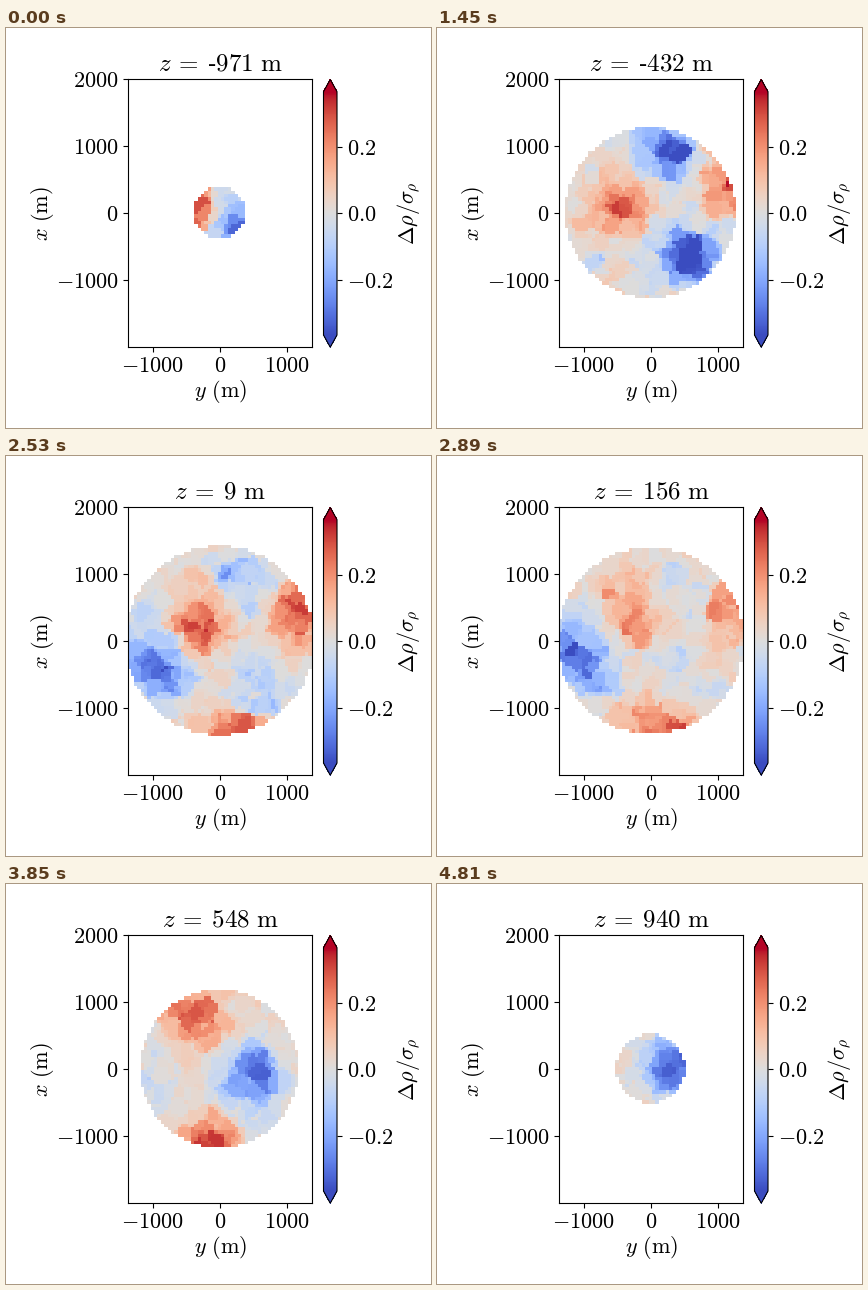
Write a matplotlib script that moves like this. It is 425x400 px and loops after 4930 ms.

```python
import numpy as np
import matplotlib.pyplot as plt
from matplotlib.animation import FuncAnimation

W, H, DPI = 425, 400, 100
LOOP, FRAMES = 4930, 170
STEP = LOOP // FRAMES
FIRST, HOLD, SLICES = 250, 120, 40
Z0, DZ = -971, 49
A, C = 1.41, 1.009         # semi-axes of the body, km
CELL = 0.05
VMAX = 0.366

# centres (y, x, z) of dense and light regions, km
DENSE = [(-0.45, 0, -1), (-0.55, 0, -0.62), (1.25, 0.45, -0.6),
         (-0.25, 0.2, -0.12), (1.2, 0.45, -0.06), (0.3, -1.45, 0),
         (-0.35, 0.8, 0.46), (-0.2, -1.15, 0.47)]
LIGHT = [(0.25, -0.2, -1.05), (0.2, 1, -0.62), (0.55, -0.6, -0.55),
         (0.6, -0.75, -0.25), (0.3, 0.85, -0.22), (-0.8, -0.55, -0.1),
         (-1.2, -0.1, 0.2), (0.5, -0.15, 0.55), (0.4, 0.05, 0.95)]
PEAK, SIZE = 0.4, (0.4, 0.4, 0.25)

plt.rcParams.update({"mathtext.fontset": "cm", "font.size": 16})


def bumps(p, centres):
    d = (p[:, None] - np.array(centres)) / SIZE
    return PEAK * np.exp(-(d**2).sum(2)).sum(1)


def make_mesh(rng, n):
    """Random nodes, each carrying one constant density."""
    pts = rng.uniform(-1, 1, (n, 3)) * (1.5, 1.5, 1.1)
    vals = bumps(pts, DENSE) - bumps(pts, LIGHT) + rng.normal(0.02, 0.04, n)
    return pts, vals


def sample(mesh, p):
    pts, vals = mesh
    d2 = (pts**2).sum(1) - 2 * p @ pts.T
    return vals[d2.argmin(1)]


rng = np.random.default_rng(7)
meshes = [make_mesh(rng, 1400) for _ in range(2)]
axis = np.arange(-28, 29) * CELL
Y, X = np.meshgrid(axis, axis)


def cut(z):
    """Horizontal slice of the body at height z in metres."""
    z = z / 1000
    inside = X**2 + Y**2 < A**2 * (1 - (z / C)**2)
    p = np.column_stack([Y[inside], X[inside], np.full(inside.sum(), z)])
    field = np.full(X.shape, np.nan)
    field[inside] = np.mean([sample(m, p) for m in meshes], axis=0)
    return field


heights = [Z0 + DZ * i for i in range(SLICES)]
fields = [cut(z) for z in heights]

fig = plt.figure(figsize=(W / DPI, H / DPI), dpi=DPI, facecolor="white")


def px_axes(left, top, right, bottom):
    return fig.add_axes([left / W, 1 - bottom / H,
                         (right - left) / W, (bottom - top) / H])


ax = px_axes(122.4, 51.5, 306.4, 318.9)
edge = 1000 * (axis[-1] + CELL / 2)
im = ax.imshow(fields[0], cmap="coolwarm", vmin=-VMAX, vmax=VMAX,
               origin="lower", extent=(-edge, edge, -edge, edge),
               interpolation="nearest", aspect="auto")
ax.set(xlim=(-1365, 1381), ylim=(-2000, 2000),
       xticks=(-1000, 0, 1000), yticks=(-1000, 0, 1000, 2000))
for side in (ax.xaxis, ax.yaxis):
    side.set_major_formatter(lambda v, _: f"${v:.0f}$")
ax.tick_params(axis="x", pad=3)
ax.set_xlabel(r"$y\ \mathrm{(m)}$", labelpad=1.8)
ax.set_ylabel(r"$x\ \mathrm{(m)}$", labelpad=0)
title = ax.set_title("", fontsize=18, pad=6.7)

bar = fig.colorbar(im, cax=px_axes(317.5, 51.5, 331, 319.2), extend="both",
                   extendfrac=0.05, ticks=(-0.2, 0, 0.2),
                   format=lambda v, _: f"${v:.1f}$")
bar.set_label(r"$\Delta\rho/\sigma_\rho$", labelpad=1.8)


def update(k):
    t = k * STEP + STEP - 1
    i = max(0, (t - FIRST) // HOLD + 1)
    z = heights[i]
    sign = "\u2010" if z < 0 else ""
    im.set_data(fields[i])
    title.set_text(rf"$z\:\mathrm{{=}}\:\mathrm{{{sign}{abs(z)}\ m}}$")
    return im, title


anim = FuncAnimation(fig, update, frames=FRAMES, interval=STEP,
                     repeat=True, repeat_delay=0, blit=False)
plt.show()
```
